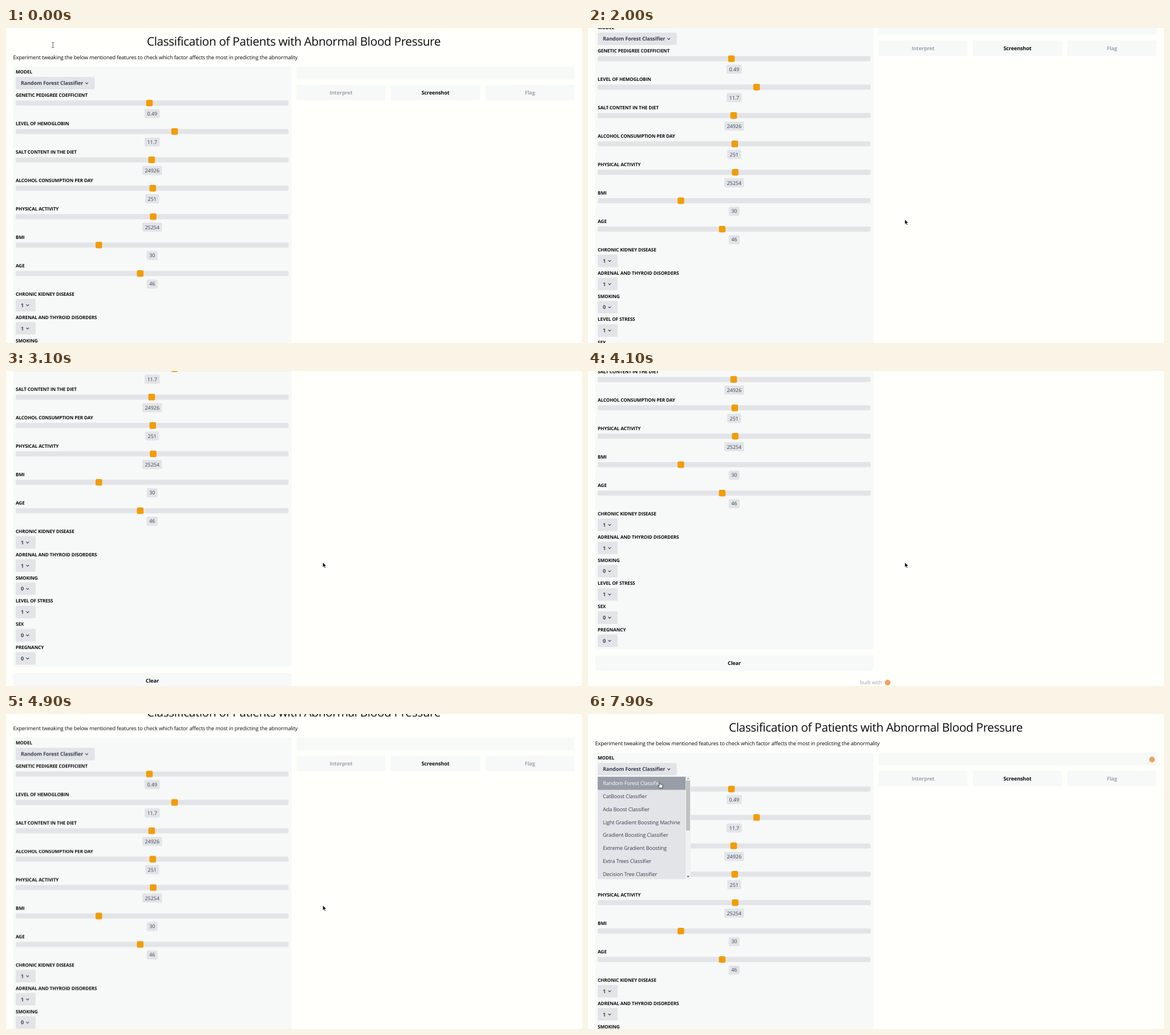
Recreate the animation shown at these times as an HTML page. Size 1010 by 554 pixels, loop 8 s.

```html
<!DOCTYPE html>
<html lang="en">
<head>
<meta charset="utf-8">
<title>Blood pressure classifier</title>
<style>
html, body { margin: 0; width: 100%; height: 100%; overflow: hidden; background: #fffffc; }
svg { display: block; width: 100vw; height: 100vh; }
text {
  font-family: "Open Sans", "Noto Sans", sans-serif;
  letter-spacing: -.018em;
  text-rendering: geometricPrecision;
  white-space: pre;
}
.bold { font-weight: 700; letter-spacing: -.015em; }
.mid { text-anchor: middle; }
.value { font-weight: 500; letter-spacing: 0; }
.chevron { fill: none; stroke: #374151; stroke-width: 1.1; }

#page, #cursor, #menu, #hover, #plain, #picked, #loader, .shape { animation: 8s step-end infinite; }
#page { animation-name: scroll; }
#cursor { animation-name: move; }
#beam { animation-name: beam; }
#arrow { animation-name: arrow; }
#hand { animation-name: hand; }
#menu { animation-name: menu; }
#hover, #picked { animation-name: hover; }
#plain { animation-name: plain; }
#loader { animation-name: loader; }

@keyframes scroll {
  0% { transform: translateY(0); }
  16.25% { transform: translateY(0); animation-timing-function: steps(3); }
  20% { transform: translateY(-28px); animation-timing-function: steps(8); }
  30% { transform: translateY(-128px); animation-timing-function: steps(7); }
  38.75% { transform: translateY(-186px); animation-timing-function: steps(4); }
  43.75% { transform: translateY(-219px); }
  46.25%, 50% { transform: translateY(-221px); }
  51.25% { transform: translateY(-217px); animation-timing-function: steps(8); }
  61.25% { transform: translateY(-26.5px); animation-timing-function: steps(2); }
  63.75% { transform: translateY(-1.5px); }
  67.5%, 100% { transform: translateY(0); }
}
@keyframes move {
  0% { transform: translate(82.3px, 30px); }
  2.5% { transform: translate(130px, 112px); }
  3.75% { transform: translate(181px, 198px); }
  6.25% { transform: translate(300px, 246px); }
  7.5% { transform: translate(478px, 312px); }
  8.75% { transform: translate(555px, 336px); }
  73.75% { transform: translate(478px, 288px); }
  75% { transform: translate(330px, 200px); }
  76.25% { transform: translate(246px, 153.5px); }
  78.75% { transform: translate(176px, 125px); }
  81.25% { transform: translate(138px, 92px); }
  83.75% { transform: translate(136.5px, 92px); }
  86.25% { transform: translate(135px, 103px); }
  87.5% { transform: translate(131px, 113px); }
  88.75% { transform: translate(128px, 118px); }
  90%, 100% { transform: translate(125.8px, 119.5px); }
}
@keyframes beam { 0% { opacity: 1; } 2.5%, 100% { opacity: 0; } }
@keyframes arrow { 0% { opacity: 0; } 2.5% { opacity: 1; } 81.25%, 100% { opacity: 0; } }
@keyframes hand { 0% { opacity: 0; } 81.25%, 100% { opacity: 1; } }
@keyframes menu { 0% { opacity: 0; } 78.75%, 100% { opacity: 1; } }
@keyframes hover { 0% { opacity: 0; } 87.5%, 100% { opacity: 1; } }
@keyframes plain { 0% { opacity: 1; } 87.5%, 100% { opacity: 0; } }
@keyframes loader { 0% { opacity: 0; } 97.5% { opacity: .6; } 98.75%, 100% { opacity: 1; } }
</style>
</head>
<body>
<svg viewBox="0 0 1010 554">
  <g id="page"></g>
  <g id="menu"></g>
  <g id="cursor">
    <path id="beam" class="shape" d="M-2-4.5H-.6L0-4 .6-4.5H2M0-4V4M-2 4.5H-.6L0 4 .6 4.5H2" fill="none" stroke="#444" stroke-width=".9"/>
    <path id="arrow" class="shape" d="M.4.4V9.4L2.5 7.5 4 10.8 5.6 10.1 4.1 6.9H7Z" fill="#111" stroke="#fff" stroke-width=".7"/>
    <path id="hand" class="shape" d="M-.9 1Q0-.3.9 1V4L4.8 4.9Q5.6 5.2 5.4 6.2L4.6 10.7H-.6L-3.1 6.9Q-2.7 5.6-.9 7Z" fill="#fff" stroke="#222" stroke-width=".9"/>
  </g>
</svg>
<script>
const NS = 'http://www.w3.org/2000/svg';
const INK = '#0b0b0d', SLATE = '#3b4252', MUTED = '#9fa4ad';
const PANEL = '#f7f9f8', GRAY = '#e3e4e8', AMBER = '#f29c07', LOGO = '#f0a35c';
const page = document.getElementById('page');
const menu = document.getElementById('menu');

function add(parent, tag, attrs) {
  const node = document.createElementNS(NS, tag);
  for (const key in attrs) node.setAttribute(key, attrs[key]);
  return parent.appendChild(node);
}

function box(x, y, width, height, fill, rx = 0, parent = page) {
  return add(parent, 'rect', { x, y, width, height, fill, rx });
}

// y is the middle of the capitals
function write(str, x, y, size, fill, cls = '', parent = page) {
  const node = add(parent, 'text', { x, y: y + size * .357, 'font-size': size, fill, class: cls });
  node.textContent = str;
  return node;
}

function label(str, y) {
  write(str, 17, y, 8.2, INK, 'bold');
}

function select(str, y, width) {
  box(17, y - 11, width, 22, GRAY, 2);
  write(str, 26, y, 9.1, SLATE, 'bold');
  add(page, 'path', { class: 'chevron', d: `M${width + 0.5} ${y - 1.2}l2.4 2.4 2.4-2.4` });
}

function slider([name, value, x], i) {
  const y = 118.2 + i * 49.95;
  label(name, y);
  box(17, y + 9.3, 478.5, 9, GRAY, 2);
  box(x - 5.8, y + 8, 11.6, 11.6, AMBER, 2.5);
  const width = value.replace('.', '').length * 5.15 + (value.includes('.') ? 2.4 : 0) + 8.8;
  box(256.3 - width / 2, y + 24.3, width, 16, GRAY, 2);
  write(value, 256.3, y + 32.3, 9, SLATE, 'value mid');
}

function button(str, x, y, width, fill) {
  box(x, y, width, 27, PANEL, 2);
  write(str, x + width / 2, y + 13.6, 9.1, fill, 'bold mid');
}

write('Classification of Patients with Abnormal Blood Pressure', 504.5, 24, 20.8, INK, 'mid');
write('Experiment tweaking the below mentioned features to check which factor affects the most in predicting the abnormality',
  12.5, 51.2, 9.3, INK);

box(12.5, 68, 488, 638.8, PANEL, 2);
label('MODEL', 77.2);
select('Random Forest Classifier', 97, 138.7);

[
  ['GENETIC PEDIGREE COEFFICIENT', '0.49', 251.5],
  ['LEVEL OF HEMOGLOBIN', '11.7', 295.6],
  ['SALT CONTENT IN THE DIET', '24926', 255.4],
  ['ALCOHOL CONSUMPTION PER DAY', '251', 257.3],
  ['PHYSICAL ACTIVITY', '25254', 258.1],
  ['BMI', '30', 162.8],
  ['AGE', '46', 235.3]
].forEach(slider);

[
  ['CHRONIC KIDNEY DISEASE', 1],
  ['ADRENAL AND THYROID DISORDERS', 1],
  ['SMOKING', 0],
  ['LEVEL OF STRESS', 1],
  ['SEX', 0],
  ['PREGNANCY', 0]
].forEach(([name, value], i) => {
  const y = 468 + i * 40.8;
  label(name, y);
  select(String(value), y + 19.5, 35);
});

button('Clear', 12.5, 717, 488, INK);
write('built with', 477, 765, 9.3, MUTED);
add(page, 'circle', { cx: 525.3, cy: 765, r: 5, fill: LOGO });

box(509.5, 68, 487.5, 22.5, PANEL, 2);
button('Interpret', 509.5, 100, 156, MUTED);
button('Screenshot', 675, 100, 156, INK);
button('Flag', 840.5, 100, 156.5, MUTED);
add(page, 'circle', { id: 'loader', cx: 989, cy: 80, r: 5, fill: LOGO });

// Open model list with its scrollbar
box(17, 110.4, 154.5, 180.2, GRAY, 0, menu);
box(171, 109, 9, 181.6, '#f1f1f1', 0, menu);
box(172, 117, 7, 88, '#c1c1c1', 0, menu);
add(menu, 'path', { d: 'M173.2 114.3h4.6l-2.3-2.6z', fill: '#a3a3a3' });
add(menu, 'path', { d: 'M173.2 284.7h4.6l-2.3 2.6z', fill: '#505050' });
box(17, 110.4, 154.2, 23, '#999da7', 0, menu).id = 'hover';

[
  'Random Forest Classifier', 'CatBoost Classifier', 'Ada Boost Classifier',
  'Light Gradient Boosting Machine', 'Gradient Boosting Classifier',
  'Extreme Gradient Boosting', 'Extra Trees Classifier', 'Decision Tree Classifier'
].forEach((name, i) => {
  const item = write(name, 26, 122 + i * 22.78, 9.25, SLATE, '', menu);
  if (i === 0) {
    item.id = 'plain';
    write(name, 26, 122, 9.25, '#fff', '', menu).id = 'picked';
  }
});
</script>
</body>
</html>
```
